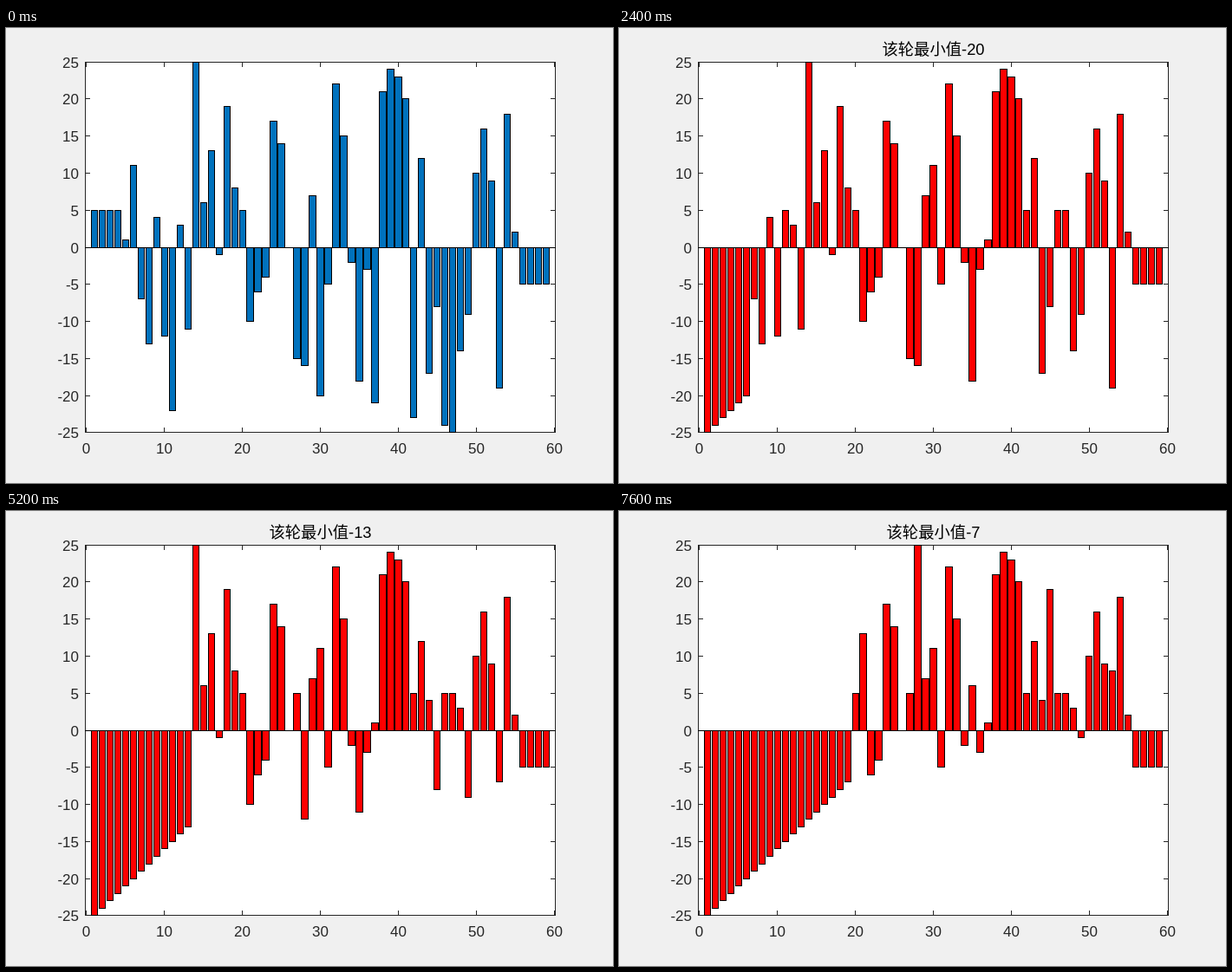
Animation, 700 px wide and 525 px high, one loop 8000 ms. Source, as an HTML page with a canvas:

```html
<!DOCTYPE html>
<html lang="zh">
<head>
<meta charset="utf-8">
<title>Selection sort</title>
<style>
html, body { margin: 0; width: 100%; height: 100%; overflow: hidden; background: #f0f0f0; }
canvas { display: block; }
</style>
</head>
<body>
<canvas id="stage" width="700" height="525"></canvas>
<script>
const ctx = document.getElementById('stage').getContext('2d');

const STEP = 400, LOOP = 8000;
const LEFT = 91, RIGHT = 633, TOP = 39, BOTTOM = 466;
const AXIS = '#262626', TICK = 5;

const start = [
  5, 5, 5, 5, 1, 11, -7, -13, 4, -12, -22, 3, -11, 25, 6, 13, -1, 19, 8, 5,
  -10, -6, -4, 17, 14, 0, -15, -16, 7, -20, -5, 22, 15, -2, -18, -3, -21, 21, 24, 23,
  20, -23, 12, -17, -8, -24, -25, -14, -9, 10, 16, 9, -19, 18, 2, -5, -5, -5, -5
];

// One selection-sort pass per step
function sortedTo(steps) {
  const a = start.slice();
  for (let i = 0; i < steps; i++) {
    let m = i;
    for (let j = i + 1; j < a.length; j++) if (a[j] < a[m]) m = j;
    [a[i], a[m]] = [a[m], a[i]];
  }
  return a;
}

const yOf = v => Math.floor(253.03 - 8.557 * v);

function rect(x, y, w, h, color) {
  ctx.fillStyle = color;
  ctx.fillRect(x, y, w, h);
}

function label(text, x, y, align) {
  ctx.textAlign = align;
  ctx.fillText(text, x, y);
}

function drawAxes() {
  const w = RIGHT - LEFT + 1, h = BOTTOM - TOP + 1;
  rect(LEFT, TOP, w, h, AXIS);
  rect(LEFT + 1, TOP + 1, w - 2, h - 2, '#fff');
  ctx.font = '17px "Liberation Sans", Arial, sans-serif';
  ctx.fillStyle = AXIS;
  for (let v = 0; v <= 60; v += 10) {
    const x = 92 + 9 * v;
    ctx.fillRect(x, TOP, 1, TICK + 1);
    ctx.fillRect(x, BOTTOM - TICK, 1, TICK + 1);
    label(v, x + 0.5, 491, 'center');
  }
  for (let v = -25; v <= 25; v += 5) {
    const y = yOf(v);
    ctx.fillRect(LEFT, y, TICK + 1, 1);
    ctx.fillRect(RIGHT - TICK, y, TICK + 1, 1);
    label(v, 84, y + 7, 'right');
  }
}

// Bar edges snap to whole pixels
function drawBar(n, v, color) {
  const x0 = 9 * n + (n <= 20 ? 89 : 88);
  const x1 = 9 * n + (n <= 40 ? 96 : 95);
  const y0 = Math.min(yOf(v), yOf(0)), y1 = Math.max(yOf(v), yOf(0));
  rect(x0, y0, x1 - x0 + 1, y1 - y0 + 1, '#000');
  if (y1 - y0 > 1) rect(x0 + 1, y0 + 1, x1 - x0 - 1, y1 - y0 - 1, color);
}

function draw(step) {
  const data = sortedTo(step);
  rect(0, 0, 700, 525, '#f0f0f0');
  drawAxes();
  data.forEach((v, i) => drawBar(i + 1, v, step ? '#f00' : '#0072bd'));
  rect(LEFT, yOf(0), RIGHT - LEFT + 1, 1, '#000');
  if (step) {
    ctx.font = '300 18.33px "Liberation Sans", "Noto Sans CJK SC", "Noto Sans CJK", sans-serif';
    ctx.fillStyle = '#000';
    label('该轮最小值' + data[step - 1], 362.5, 31, 'center');
  }
}

const t0 = performance.now();
let shown = -1;
function tick() {
  const step = Math.floor(((performance.now() - t0) % LOOP) / STEP);
  if (step !== shown) draw(shown = step);
  requestAnimationFrame(tick);
}
tick();
</script>
</body>
</html>
```
